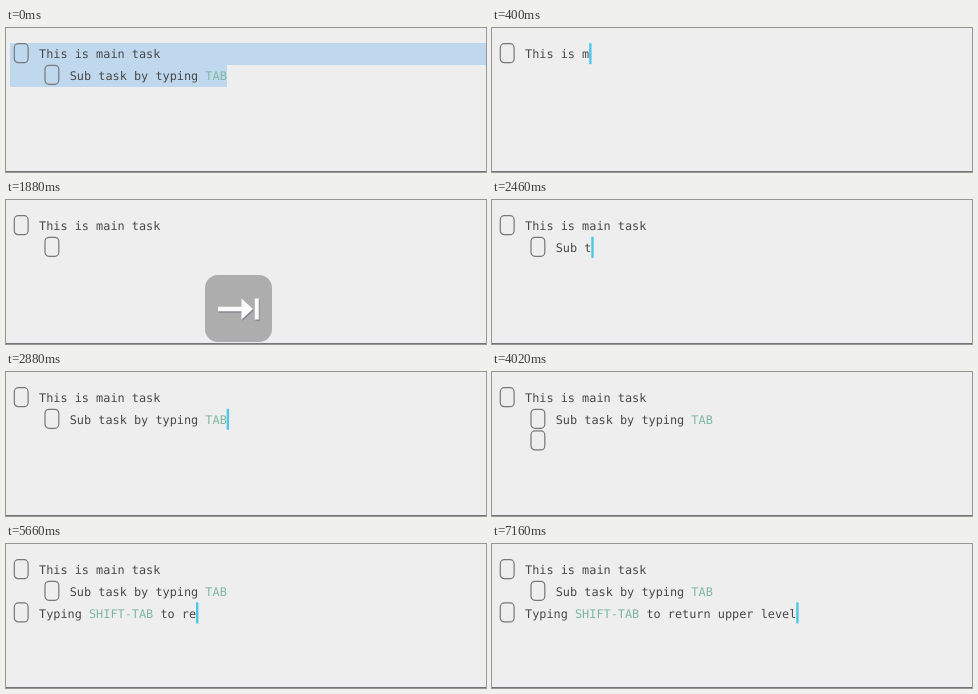
Recreate the animation shown at these times as an HTML page. Size 480 by 144 pixels, loop 7340 ms.

```html
<!DOCTYPE html>
<html lang="en">
<head>
<meta charset="utf-8">
<title>Task list</title>
<style>
  html, body { margin: 0; width: 100%; height: 100%; overflow: hidden; background: #eee; }
  svg { display: block; width: 480px; height: 144px; }
  text {
    font: 11.86px "DejaVu Sans Mono", monospace;
    fill: #484848;
    white-space: pre;
    text-rendering: geometricPrecision;
  }
  .key { fill: #7fb8a2; }
  .box { fill: none; stroke: #777; stroke-width: 1.2; }
</style>
</head>
<body>
<svg viewBox="0 0 480 144">
  <rect width="480" height="144" fill="#eee"/>
  <path id="selection" d="M4 15H480V37H221V59H4Z" fill="#c0d8ed"/>
  <g id="lines"></g>
  <rect id="caret" width="2.4" height="21" fill="#4fc6e6"/>
  <rect y="143" width="480" height="1" fill="#77757b"/>
  <g id="overlay">
    <rect x="199" y="75" width="67" height="67" rx="13" fill="#9a9a9a"/>
    <g id="arrow">
      <path id="tab" d="M212 106.7H235.5V98.5L247 109L235.5 119.500V111.300H212ZM248.800 98.500H252.800V119.500H248.800Z" fill="#5d5976" opacity=".75" transform="translate(.8 1.500)"/>
      <path id="tabFace" fill="#fff"/>
    </g>
  </g>
</svg>
<script>
const LOOP = 7340, ADVANCE = 7.14, INDENT = 30.7, ROW = 21.6;
const $ = id => document.getElementById(id);
const clamp = v => Math.max(0, Math.min(1, v));
const within = (t, [from, to]) => t >= from && t < to;

// Each line: text with its coloured word, and typing keys as [time, characters].
const lines = [
  { text: 'This is main task', keys: [[320, 1], [480, 17]], shown: 0 },
  { text: 'Sub task by typing TAB', word: 'TAB', keys: [[2420, 1], [2460, 5], [2880, 22]], shown: 640 },
  { text: 'Typing SHIFT-TAB to return upper level', word: 'SHIFT-TAB', keys: [[5300, 1], [5940, 38]], shown: 3680 }
];
const caretOff = [[0, 20], [960, 1280], [1620, 1940], [2280, 2420], [3040, 3360],
                  [4020, 4300], [4620, 4940], [6180, 6500], [6820, 7160]];
const presses = [{ on: 1220, fade: 1840, off: 2020 }, { on: 4220, fade: 4840, off: 5000, back: true }];

function add(parent, tag, attrs = {}) {
  const el = document.createElementNS('http://www.w3.org/2000/svg', tag);
  for (const name in attrs) el.setAttribute(name, attrs[name]);
  return parent.appendChild(el);
}

lines.forEach((line, i) => {
  line.group = add($('lines'), 'g');
  add(line.group, 'rect', { class: 'box', x: 8.3, y: 15.7 + i * ROW, width: 13.8, height: 19, rx: 4 });
  const label = add(line.group, 'text', { x: 33, y: 30.4 + i * ROW });
  line.start = line.word ? line.text.indexOf(line.word) : line.text.length;
  line.end = line.start + (line.word || '').length;
  line.spans = ['', 'key', ''].map(name => add(label, 'tspan', { class: name }));
});
$('tabFace').setAttribute('d', $('tab').getAttribute('d'));

function typed(keys, t) {
  if (t < keys[0][0]) return 0;
  for (let i = 1; i < keys.length; i++) {
    const [t0, n0] = keys[i - 1], [t1, n1] = keys[i];
    if (t < t1) return Math.round(n0 + (n1 - n0) * (t - t0) / (t1 - t0));
  }
  return keys[keys.length - 1][1];
}

function indentAt(row, t) {
  if (row === 1) return t < 20 || t >= 1280 ? INDENT : 0;
  return row === 2 && t < 4300 ? INDENT : 0;
}

function draw(t) {
  const selected = t < 20;
  $('selection').setAttribute('opacity', selected ? 1 : clamp((120 - t) / 120));

  let row = 0, column = 0;
  lines.forEach((line, i) => {
    const visible = t >= line.shown || (selected && i < 2);
    const count = selected ? line.text.length : typed(line.keys, t);
    line.group.setAttribute('visibility', visible ? 'visible' : 'hidden');
    line.group.setAttribute('transform', `translate(${indentAt(i, t)} 0)`);
    const text = line.text.slice(0, count);
    [text.slice(0, line.start), text.slice(line.start, line.end), text.slice(line.end)]
      .forEach((part, k) => { line.spans[k].textContent = part; });
    if (visible) { row = i; column = count; }
  });

  const caret = $('caret');
  caret.setAttribute('x', 32.9 + indentAt(row, t) + column * ADVANCE);
  caret.setAttribute('y', 15.2 + row * ROW);
  caret.setAttribute('visibility', caretOff.some(span => within(t, span)) ? 'hidden' : 'visible');

  const press = presses.find(p => within(t, [p.on, p.off]));
  $('overlay').setAttribute('opacity', press ? clamp((press.off - t) / (press.off - press.fade)) : 0);
  $('arrow').setAttribute('transform', press && press.back ? 'translate(465 0) scale(-1 1)' : '');
}

const began = performance.now();
function tick() {
  draw((performance.now() - began) % LOOP);
  requestAnimationFrame(tick);
}
tick();
</script>
</body>
</html>
```
